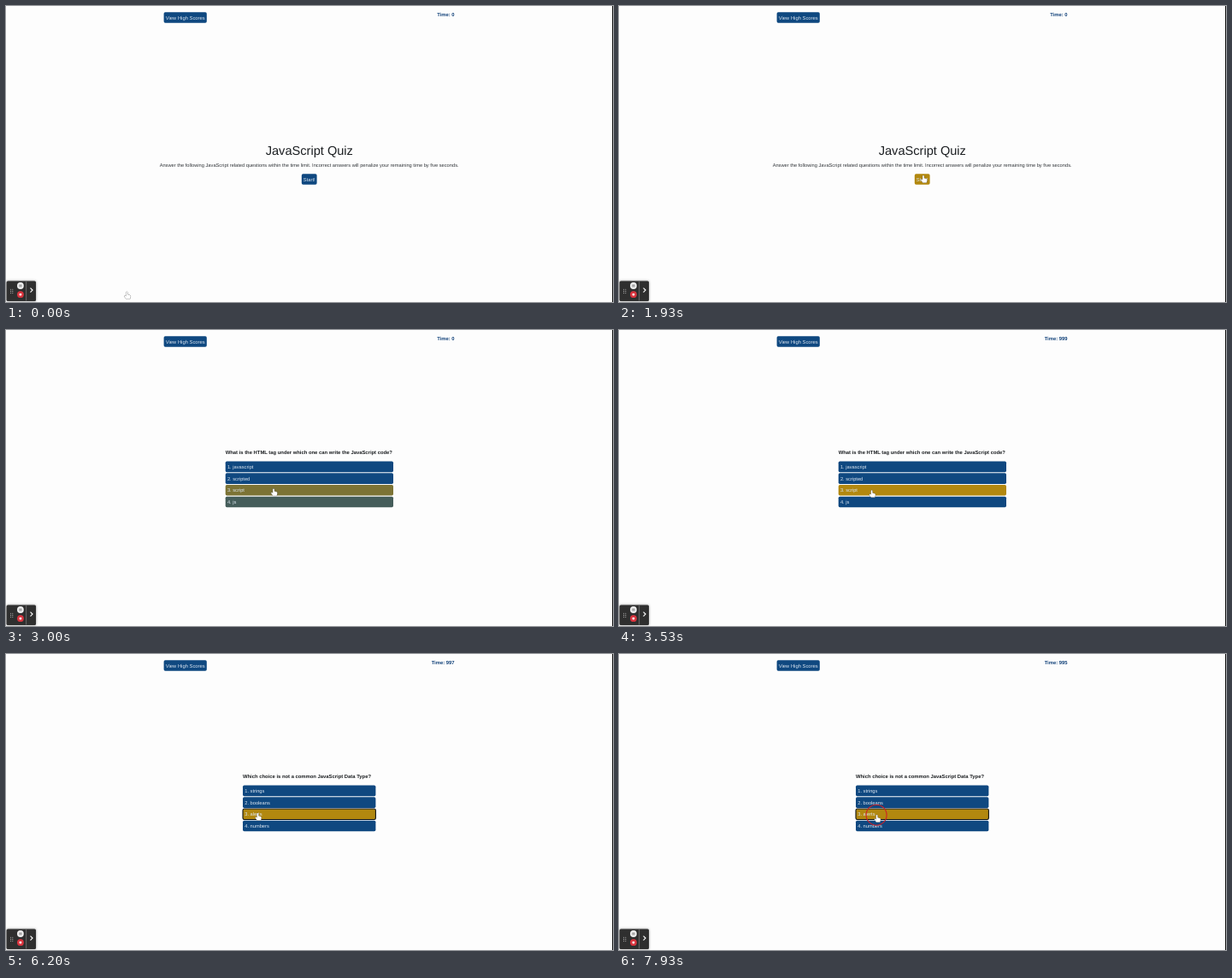
Write an HTML page with a canvas that moves like this. It is 710 px wide and 346 px high and loops after 8 s.

```html
<!DOCTYPE html>
<html lang="en">
<head>
<meta charset="utf-8">
<title>JavaScript Quiz</title>
<style>
  html, body { margin: 0; width: 100%; height: 100%; overflow: hidden; background: #fdfdfd; }
  canvas { display: block; width: 710px; height: 346px; }
</style>
</head>
<body>
<canvas id="stage"></canvas>
<script>
const W = 710, H = 346, LOOP = 8000, STEP = 200 / 3;
const SANS = '"Liberation Sans", Arial, sans-serif';
const BLUE = [15, 72, 128], GOLD = [178, 136, 15];

const canvas = document.getElementById('stage');
const ctx = canvas.getContext('2d');
const dpr = window.devicePixelRatio || 1;
canvas.width = W * dpr;
canvas.height = H * dpr;
ctx.scale(dpr, dpr);
ctx.textRendering = 'geometricPrecision';

const QUIZ_START = 2330, ANSWERED = 3800, NEXT = 4800;
const questions = [
  { x: 256.7, w: 196.3, text: 'What is the HTML tag under which one can write the JavaScript code?',
    answers: ['javascript', 'scripted', 'script', 'js'] },
  { x: 277, w: 155.4, text: 'Which choice is not a common JavaScript Data Type?',
    answers: ['strings', 'booleans', 'alerts', 'numbers'] }
];

// Pointer tip: time, x, y
const path = [
  [0, 141.3, 334], [200, 141.3, 334], [660, 230, 280], [800, 230, 280],
  [1600, 345, 209], [1660, 345, 209], [1860, 356, 198], [2860, 356, 198],
  [3000, 313, 185.3], [3200, 308, 186], [3600, 294.6, 187.3], [6200, 294.4, 186],
  [6400, 302.5, 163.5], [7330, 302.5, 163.5], [7700, 301.6, 188]
];
const clicks = [[2190, 2470], [3720, 4010], [7920, 8200]];

const ease = k => k * k * (3 - 2 * k);

function pointer(t) {
  const i = path.findIndex(p => p[0] > t);
  if (i < 1) return path[i < 0 ? path.length - 1 : 0].slice(1);
  const [a, b] = [path[i - 1], path[i]];
  const k = ease((t - a[0]) / (b[0] - a[0]));
  return [a[1] + (b[1] - a[1]) * k, a[2] + (b[2] - a[2]) * k];
}

function text(str, x, y, size, color, style = '', align = 'left') {
  ctx.font = `${style} ${size}px ${SANS}`;
  ctx.textAlign = align;
  ctx.fillStyle = color;
  ctx.fillText(str, x, y);
}

function box(x, y, w, h, r, fill) {
  ctx.beginPath();
  ctx.roundRect(x, y, w, h, r);
  ctx.fillStyle = fill;
  ctx.fill();
}

function disc(x, y, r, fill) {
  ctx.beginPath();
  ctx.arc(x, y, r, 0, Math.PI * 2);
  ctx.fillStyle = fill;
  ctx.fill();
}

// Share of the last 150 ms that the pointer spent over the box
function hover(t, x, y, w, h, since) {
  const inside = s => {
    const [px, py] = pointer(s);
    return s >= since && px >= x && px <= x + w && py >= y && py <= y + h;
  };
  return [0, 50, 100].filter(d => inside(t - d)).length / 3;
}

function button(x, y, w, h, glow) {
  const rgb = BLUE.map((c, i) => Math.round(c + (GOLD[i] - c) * glow));
  box(x, y, w, h, 1.7, `rgb(${rgb})`);
}

function header(t) {
  button(184.6, 7.2, 50.2, 12.5, 0);
  text('View High Scores', 209.7, 15.6, 5.83, '#dce6f0', '', 'center');
  const ticks = Math.floor((t - QUIZ_START) / 1000);
  text('Time: ' + (ticks > 0 ? 1000 - ticks : 0), 524.5, 12.1, 5.85, '#12427a', 'bold', 'right');
}

function intro(t) {
  text('JavaScript Quiz', 354.8, 174.3, 14.6, '#1c1f22', '', 'center');
  text('Answer the following JavaScript related questions within the time limit. ' +
    'Incorrect answers will penalize your remaining time by five seconds.',
    354.6, 188, 5.71, '#33373b', '', 'center');
  const area = [345.8, 196.2, 17.8, 12.5];
  button(...area, hover(t, ...area, 0));
  text('Start!', 354.7, 204.6, 5.8, '#dce6f0', '', 'center');
}

function quiz(t) {
  const q = questions[t < NEXT ? 0 : 1];
  const locked = t >= ANSWERED && t < NEXT;
  const since = t < NEXT ? QUIZ_START : NEXT;
  text(q.text, q.x, 145.1, 5.86, '#1c1f22', 'bold');
  q.answers.forEach((answer, i) => {
    const y = 153.6 + i * 13.68;
    const area = [q.x, y, q.w, 12.6];
    button(...area, locked ? 0 : hover(t, ...area, since));
    if (i === 2 && t >= ANSWERED) {
      ctx.strokeStyle = '#101418';
      ctx.lineWidth = 1.1;
      ctx.stroke();
    }
    text(`${i + 1}. ${answer}`, q.x + 2.2, y + 8.4, 5.72, '#dce6f0');
  });
  if (locked) {
    box(q.x, 210.6, q.w, 0.8, 0, '#a2a2a2');
    text('Correct', q.x, 223, 7.9, '#118a11', 'italic bold');
  }
}

function recorder() {
  ctx.save();
  ctx.shadowColor = 'rgba(0,0,0,.45)';
  ctx.shadowBlur = 3 * dpr;
  box(0.6, 321.4, 34.4, 23.6, 1.5, '#2f2f2f');
  ctx.restore();
  box(23.3, 322, 0.8, 22.4, 0, '#777');
  for (let i = 0; i < 6; i++) disc(5.6 + (i % 2) * 2.2, 331.2 + (i >> 1) * 2.2, 0.55, '#bbb');
  disc(16.9, 327, 3.9, '#eee');
  box(15.5, 325.4, 1, 3.2, 0, '#777');
  box(17.3, 325.4, 1, 3.2, 0, '#777');
  disc(16.9, 337.2, 3.9, '#d9343e');
  box(15.6, 335.9, 2.6, 2.6, 0.4, '#fff');
  ctx.beginPath();
  ctx.moveTo(28.5, 329.6);
  ctx.lineTo(31, 332.1);
  ctx.lineTo(28.5, 334.6);
  ctx.strokeStyle = '#fff';
  ctx.lineWidth = 1.2;
  ctx.stroke();
}

const handShape = new Path2D(
  'M-.8.6Q0-.4.8.6V3.3L3.4 4Q4.4 4.3 4.3 5.4L3.7 8.4H-.7L-2.7 5.6Q-3 4.6-2 4.5L-.8 5.4Z');

function hand([x, y]) {
  ctx.save();
  ctx.translate(x, y);
  ctx.fillStyle = '#fff';
  ctx.strokeStyle = '#555';
  ctx.lineWidth = 0.65;
  ctx.lineJoin = 'round';
  ctx.stroke(handShape);
  ctx.fill(handShape);
  ctx.restore();
}

function ring(t, [x, y]) {
  const click = clicks.find(c => t >= c[0] && t < c[1]);
  if (!click) return;
  ctx.save();
  ctx.globalAlpha = Math.min(1, (click[1] - t) / 120);
  ctx.beginPath();
  ctx.arc(x - 0.5, y + 0.2, 12, 0, Math.PI * 2);
  ctx.strokeStyle = '#cf1f26';
  ctx.lineWidth = 1.1;
  ctx.stroke();
  ctx.restore();
}

function draw(t) {
  box(0, 0, W, H, 0, '#fdfdfd');
  box(709, 0, 1, H, 0, '#151515');
  header(t);
  (t < QUIZ_START ? intro : quiz)(t);
  recorder();
  const tip = pointer(t);
  ring(t, tip);
  hand(tip);
}

function frame() {
  const t = performance.now() % LOOP;
  draw(Math.floor((t + 8) / STEP) * STEP);
  requestAnimationFrame(frame);
}
frame();
</script>
</body>
</html>
```
